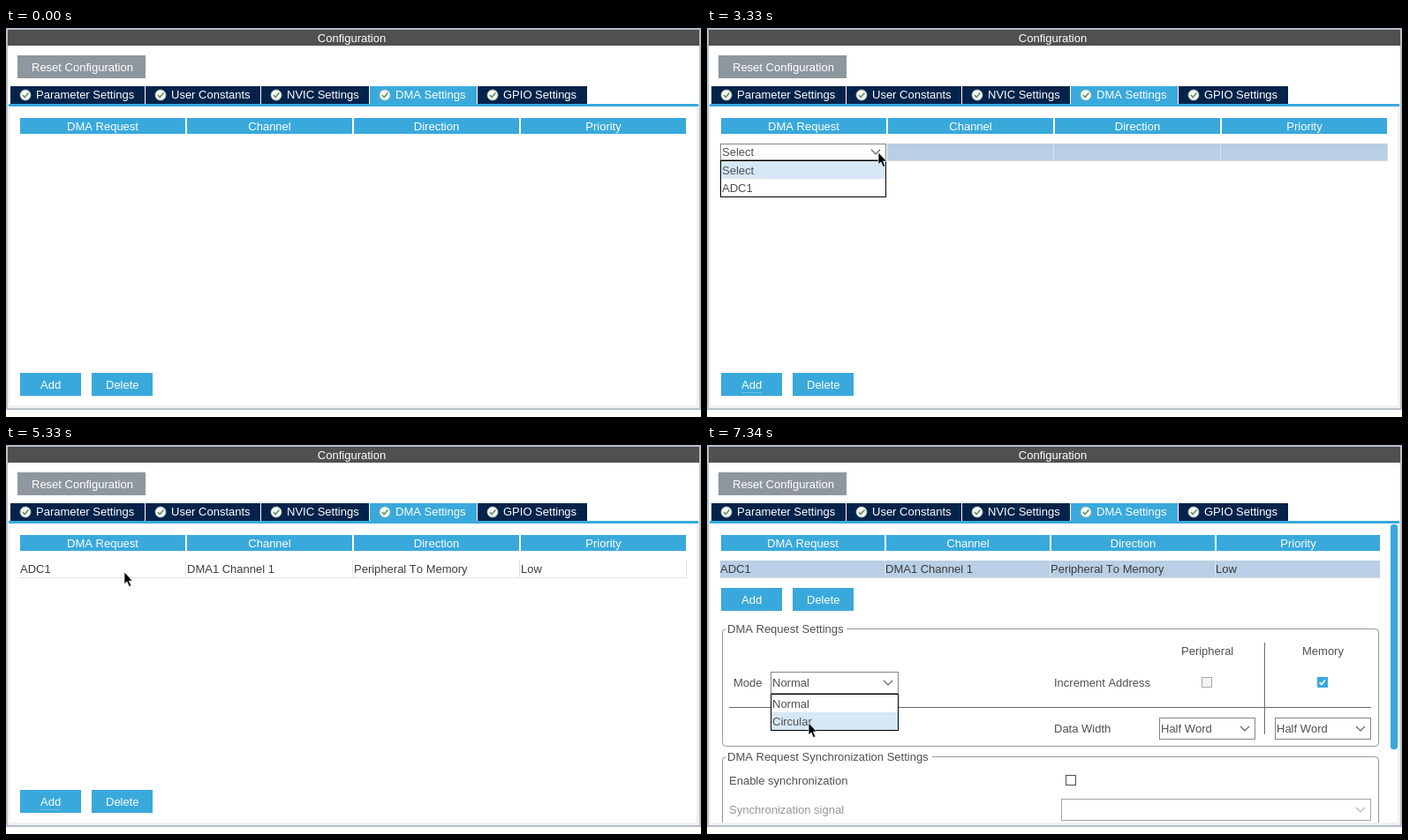
Animation, 787 px wide and 441 px high, one loop 8 s. Source, as an HTML page:

```html
<!DOCTYPE html>
<html lang="en">
<head>
<meta charset="utf-8">
<title>Configuration</title>
<style>
html, body { margin: 0; width: 100%; height: 100%; overflow: hidden; background: #fff; }
svg { display: block; }
text { font: 13px "Liberation Sans", Arial, sans-serif; font-kerning: none; white-space: pre; }
</style>
</head>
<body>
<svg id="stage" width="787" height="441" viewBox="0 0 787 441"></svg>
<script>
const LOOP = 8000;
const BLUE = '#39a9dc', NAVY = '#03234b', ROW = '#b8cfe5', INK = '#3c3c3c', LABEL = '#505050', HOVER = '#d6e7f5';

// Drawing helpers; boxes are given by their edges.
const rect = (x1, y1, x2, y2, fill, more = '') =>
  `<rect x="${x1}" y="${y1}" width="${x2 - x1}" height="${y2 - y1}" fill="${fill}" ${more}/>`;
const frame = (x1, y1, x2, y2, stroke, fill = '#fff', more = '') =>
  rect(x1 + .5, y1 + .5, x2 - .5, y2 - .5, fill, `stroke="${stroke}" ${more}`);
const line = (d, stroke, width = 1) =>
  `<path d="${d}" fill="none" stroke="${stroke}" stroke-width="${width}"/>`;
const text = (x, y, str, fill = INK, anchor = 'start') =>
  `<text x="${x}" y="${y}" fill="${fill}" text-anchor="${anchor}">${str}</text>`;
const group = (id, ...parts) => `<g id="${id}">${parts.join('')}</g>`;

const tick = (x, y, color) => line(`M${x - 3} ${y}l2.2 2.6 4.2-5`, color, 1.6);
const chevron = (x, y, color = '#606060') => line(`M${x - 5} ${y}l5 5 5-5`, color, 1.2);

function tab(x1, x2, label, fill = NAVY) {
  const cx = x1 + 17;
  return rect(x1, 66, x2, 86, fill) +
    `<circle cx="${cx}" cy="76" r="6" fill="#f6f9f0" stroke="#aebbb2" stroke-width=".8"/>` +
    tick(cx, 76, '#66906c') + text(cx + 12, 80, label, '#fff');
}

function header(pitch) {
  return ['DMA Request', 'Channel', 'Direction', 'Priority'].map((label, i) => {
    const x = 16 + i * pitch, w = pitch - 2;
    return rect(x, 102, x + w, 120, BLUE) + text(x + w / 2, 116, label, '#fff', 'middle');
  }).join('');
}

function rowTexts(x, pitch) {
  return ['ADC1', 'DMA1 Channel 1', 'Peripheral To Memory', 'Low']
    .map((label, i) => text(x + i * pitch, 145, label)).join('');
}

function rules(x, pitch, count, color) {
  let out = '';
  for (let i = 0; i < count; i++) out += line(`M${x + i * pitch + .5} 131v19`, color);
  return out;
}

const button = (x, y, label, tx) =>
  rect(x, y, x + 69, y + 26, BLUE) + text(tx, y + 18, label, '#fff');
const buttons = y => button(16, y, 'Add', 39) + button(97, y, 'Delete', 113);

function combo(x1, y1, x2, y2, label, color = '#858585') {
  const mid = (y1 + y2) / 2;
  return frame(x1, y1, x2, y2, color) + text(x1 + 2, mid + 4.5, label, LABEL) +
    chevron(x2 - 12, mid - 2.5, label ? '#606060' : '#b4b4b4');
}

function popup(id, x1, y1, x2, items) {
  return group(id, frame(x1, y1, x2, y1 + 42, '#000'),
    `<rect id="${id}Pick" x="${x1 + 1}" y="${y1 + 1}" width="${x2 - x1 - 2}" height="20" fill="${HOVER}"/>`,
    ...items.map((item, i) => text(x1 + 2, y1 + 16 + 20 * i, item, LABEL)));
}

const fieldset = (y1, y2, title, w) =>
  frame(17, y1, 761, y2, '#969696', '#fff', 'rx="4"') +
  rect(21, y1 - 1, 24 + w, y1 + 2, '#fff') + text(23, y1 + 5, title, LABEL);

const details = [
  header(187),
  rect(15, 131, 762, 150, ROW), rules(201, 187, 3, '#d7e3ef'), line('M15 150.5H763', '#dadada'),
  rowTexts(15, 187),
  buttons(162),
  fieldset(208, 342, 'DMA Request Settings', 134),
  text(537, 238, 'Peripheral', LABEL), text(674, 238, 'Memory', LABEL),
  line('M631.5 224V328', '#6b6b6b'), line('M25 297.5H752', '#6b6b6b'),
  text(30, 274, 'Mode', LABEL), combo(72, 257, 217, 282, 'Normal'),
  text(393, 274, 'Increment Address', LABEL),
  frame(560, 263, 572, 275, '#a8a8a8', '#f3f3f3'),
  rect(691, 263, 703, 275, BLUE), tick(696.6, 269, '#fff'),
  text(393, 326, 'Data Width', LABEL),
  combo(512, 309, 621, 334, 'Half Word'), combo(643, 309, 752, 334, 'Half Word'),
  fieldset(353, 450, 'DMA Request Synchronization Settings', 231),
  text(25, 385, 'Enable synchronization', LABEL), frame(406, 374, 418, 386, '#505050'),
  text(25, 418, 'Synchronization signal', '#979797'), combo(401, 401, 752, 426, '', '#a5a5a5'),
  `<rect id="bar" width="8" rx="3" fill="${BLUE}"/>`
];

const stage = document.getElementById('stage');
stage.innerHTML = [
  '<clipPath id="panel"><rect x="4" y="89" width="779" height="339"/></clipPath>',
  rect(0, 0, 787, 433, '#b5c0cb'), rect(2, 2, 785, 431, '#f0f0f0'),
  rect(2, 20, 785, 86, '#fff'), rect(4, 89, 782, 428, '#fff'),
  rect(2, 2, 785, 20, '#505050'), text(391.5, 16, 'Configuration', '#fff', 'middle'),
  rect(13, 31, 158, 57, '#8f979e'), text(29, 49, 'Reset Configuration', '#fff'),
  tab(5, 157, 'Parameter Settings'), tab(158, 288, 'User Constants'),
  tab(289, 411, 'NVIC Settings'), tab(412, 533, 'DMA Settings', BLUE),
  tab(534, 658, 'GPIO Settings'),
  rect(3, 86, 784, 89, BLUE),
  group('simple', header(189), buttons(391),
    group('hot', rect(16, 391, 85, 417, '#76c6e9'), text(39, 409, 'Add', '#fff')),
    `<path id="focus" d="M39 413.5h23" stroke="#fff"/>`),
  group('picking', rect(204, 131, 770, 150, ROW), rules(392, 189, 2, '#d7e3ef'),
    line('M203 150.5H771M770.5 131v19', '#dadada'), combo(15, 131, 203, 150, 'Select')),
  popup('requests', 15, 150, 203, ['Select', 'ADC1']),
  group('added', rules(203, 189, 4, '#dfe3e6'), line('M15 150.5H771', '#dfe3e6'), rowTexts(16, 189)),
  `<g id="details" clip-path="url(#panel)">${details.join('')}</g>`,
  popup('modes', 72, 282, 217, ['Normal', 'Circular']),
  '<path id="cursor" d="M0 0V13.6L3 10.9L5.5 16.6L7.9 15.6L5.4 10.1H9.4Z" fill="#000" stroke="#fff" stroke-width=".7"/>',
  '<circle id="click" r="12" fill="#fff000" fill-opacity=".55"/>'
].join('');

const el = id => document.getElementById(id);

// Visible spans of each part: [from, to).
const spans = {
  simple: [0, 5670], hot: [1660, 2650], focus: [1990, 5670], picking: [2320, 4330],
  requests: [3330, 4330], added: [4330, 5670], details: [5670, LOOP],
  modes: [6670, LOOP], cursor: [660, LOOP]
};
const clicks = [[1990, 2320], [3990, 4330]];

// Pointer stops: time, x, y.
const stops = [
  [660, 589, 101], [990, 469, 77], [1330, 130, 343], [1660, 77, 397], [1990, 68, 404],
  [2650, 127, 243], [2990, 202, 146], [3330, 194, 141], [3660, 134, 178], [3990, 126, 184],
  [5330, 134, 144], [5670, 135, 142], [6000, 87, 204], [6340, 118, 276], [6670, 118, 280],
  [7000, 115, 309], [7340, 115, 315]
];

const within = (t, [from, to]) => t >= from && t < to;
const show = (id, on) => el(id).setAttribute('visibility', on ? 'visible' : 'hidden');
const set = (id, attrs) => {
  for (const key in attrs) el(id).setAttribute(key, attrs[key]);
};

function draw(t) {
  for (const id in spans) el(id).style.display = within(t, spans[id]) ? '' : 'none';
  const [, x, y] = stops.filter(stop => stop[0] <= t).pop() || stops[0];
  set('cursor', { transform: `translate(${x} ${y})` });
  set('click', { cx: x - 1, cy: y - 1 });
  show('click', clicks.some(span => within(t, span)));
  show('hot', within(t, spans.hot));
  set('focus', { 'stroke-opacity': t < 3330 ? .7 : .25 });
  set('requestsPick', { y: t < 3660 ? 151 : 171 });
  set('modesPick', { y: t < 7000 ? 283 : 303 });
  const top = t < 6670 ? 101 : 90;
  set('bar', { x: t < 6670 ? 763 : 774, y: top, height: 345 - top });
}

const start = performance.now();
function loop() {
  draw((performance.now() - start) % LOOP);
  requestAnimationFrame(loop);
}
loop();
</script>
</body>
</html>
```
